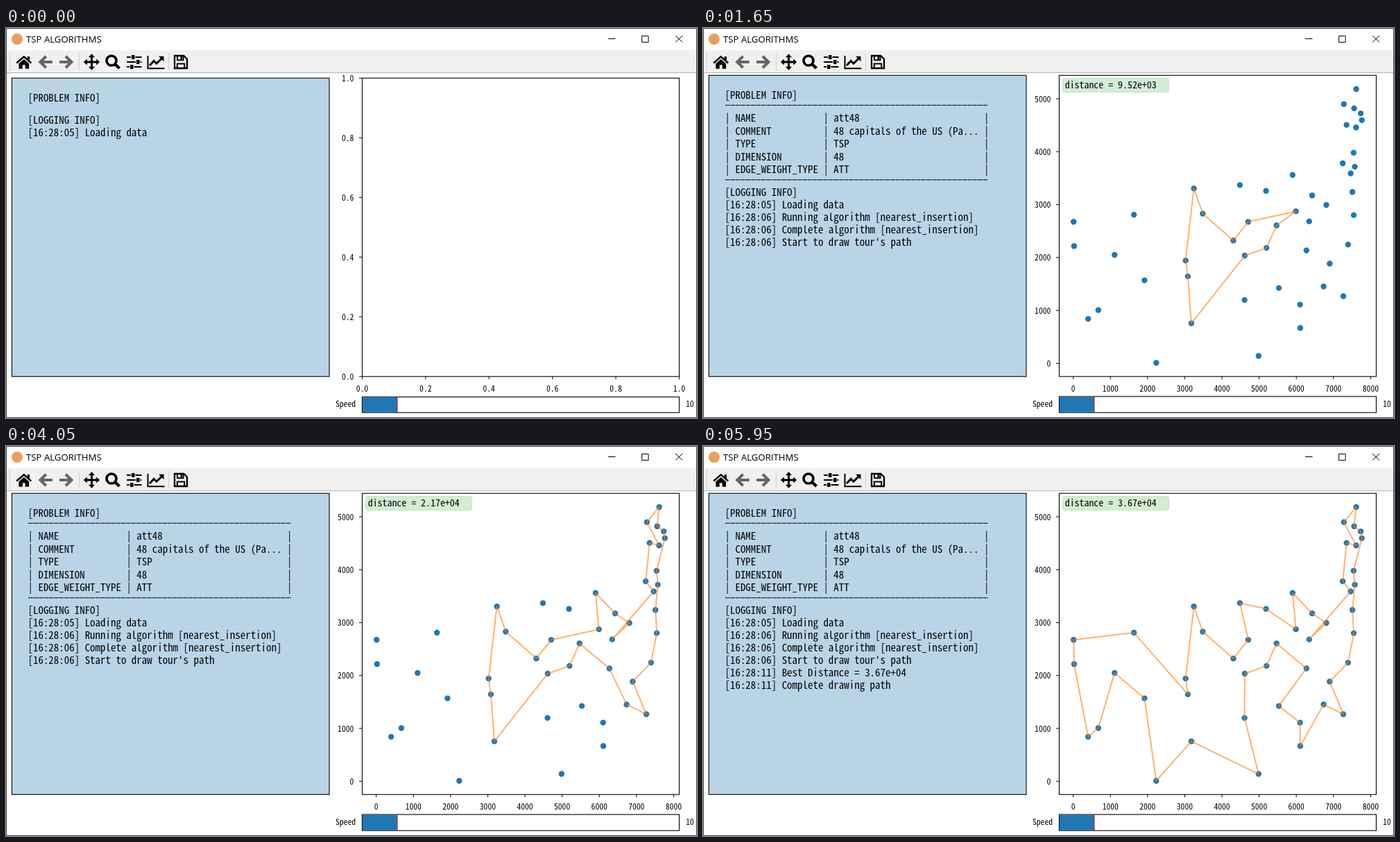
An HTML page with a canvas for the animation above (6250 ms loop, 996 px wide and 562 px high).

```html
<!DOCTYPE html>
<html lang="en">
<head>
<meta charset="utf-8">
<title>TSP ALGORITHMS</title>
<style>
html, body { margin: 0; width: 100%; height: 100%; overflow: hidden; background: #fff; }
canvas { display: block; }
</style>
</head>
<body>
<canvas id="stage" width="996" height="562"></canvas>
<script>
const ctx = document.getElementById('stage').getContext('2d');
const LOOP = 6250;
const BLUE = '#1f77b4';
const MONO = '"Noto Sans Mono CJK SC", "Noto Sans Mono CJK JP", "Liberation Mono", monospace';
const LOG_PITCH = 7.47;
const LABEL_PITCH = 5.8;
const LEFT = 513.4, RIGHT = 970.4, TOP = 68.2, BOTTOM = 502.2;

// The cities of att48 in the order of the finished tour.
const cities = [
  [3082, 1644], [3023, 1942], [3245, 3305], [3484, 2829], [4307, 2322], [4706, 2674],
  [4483, 3369], [5185, 3258], [5989, 2873], [5900, 3561], [6426, 3173], [6807, 2993],
  [6347, 2683], [7462, 3590], [7248, 3779], [7352, 4506], [7608, 4458], [7280, 4899],
  [7611, 5184], [7555, 4819], [7732, 4723], [7762, 4595], [7541, 3981], [7573, 3716],
  [7509, 3239], [7545, 2801], [7392, 2244], [6898, 1885], [7265, 1268], [6734, 1453],
  [6107, 669], [6101, 1110], [5530, 1424], [6271, 2135], [5468, 2606], [5199, 2182],
  [4612, 2035], [4608, 1198], [4985, 140], [3177, 756], [2233, 10], [1916, 1569],
  [1112, 2049], [675, 1006], [401, 841], [23, 2216], [10, 2676], [1633, 2809]
];
const START_CITY = 39;

const distance = (a, b) => Math.hypot(a[0] - b[0], a[1] - b[1]);

// Nearest insertion: always take the city closest to the tour.
function insertionRanks() {
  const rank = cities.map(() => Infinity);
  const gap = cities.map(c => distance(c, cities[START_CITY]));
  for (let n = 0; n < cities.length; n++) {
    let next = -1;
    cities.forEach((c, i) => {
      if (rank[i] === Infinity && (next < 0 || gap[i] < gap[next])) next = i;
    });
    rank[next] = n;
    cities.forEach((c, i) => { gap[i] = Math.min(gap[i], distance(c, cities[next])); });
  }
  return rank;
}
const ranks = insertionRanks();

// Fits the data between two edges with a margin of 5% of its range on both sides.
function fitScale(values, from, to) {
  const min = Math.min(...values);
  const range = Math.max(...values) - min;
  return v => from + (to - from) * (0.05 + (v - min) / range) / 1.1;
}
const px = fitScale(cities.map(c => c[0]), LEFT, RIGHT);
const py = fitScale(cities.map(c => c[1]), BOTTOM, TOP);

// The plot redraws after 100 and 150 ms in turn.
function lastRedraw(t) {
  const cycle = 50 + 250 * Math.floor((t - 50) / 250);
  return t - cycle < 100 ? cycle : cycle + 100;
}

// One city joins the tour every 108 ms.
function tourLength(t) {
  if (t < 600) return 0;
  const count = Math.floor((lastRedraw(t) - 451) / 108);
  return Math.min(Math.max(count, 1), cities.length);
}

function fillBox(x, y, w, h, color) {
  ctx.fillStyle = color;
  ctx.fillRect(x, y, w, h);
}

function frameBox(left, top, right, bottom, fill) {
  fillBox(left, top, right - left, bottom - top, fill);
  ctx.strokeStyle = '#000';
  ctx.lineWidth = 1.1;
  ctx.strokeRect(left, top, right - left, bottom - top);
}

function line(path, width = 1, color = '#000') {
  ctx.strokeStyle = color;
  ctx.lineWidth = width;
  ctx.stroke(new Path2D(path));
}

function shape(path, color = '#000') {
  ctx.fillStyle = color;
  ctx.fill(new Path2D(path));
}

function circle(x, y, r, color) {
  ctx.beginPath();
  ctx.arc(x, y, r, 0, 2 * Math.PI);
  ctx.fillStyle = color;
  ctx.fill();
}

// Draws an icon around its own centre.
function icon(x, y, paint) {
  ctx.save();
  ctx.translate(x, y);
  paint();
  ctx.restore();
}

ctx.font = `100px ${MONO}`;
const advance = ctx.measureText('0').width / 100;

function text(str, x, middle, pitch, align = 'left') {
  ctx.font = `${pitch / advance}px ${MONO}`;
  ctx.textAlign = align;
  ctx.fillStyle = '#000';
  ctx.fillText(str, x, middle + 0.7 * pitch);
}

function drawTitleBar() {
  circle(16, 16, 8, '#e9a05b');
  ctx.font = '13.2px "Open Sans", "Noto Sans", sans-serif';
  ctx.textAlign = 'left';
  ctx.fillStyle = '#000';
  ctx.fillText('TSP ALGORITHMS', 29, 21);
  line('M868 15.5h10.5M916.5 11.5h9.5v9h-9.5ZM965 11l10 9.5m0 -9.5l-10 9.5');
}

const icons = {
  home() {
    line('M-10.5 1.5L0 -7.6L10.5 1.5', 2.5);
    shape('M5 -8h3.2v7l-3.2 -3ZM-7.3 2.3L0 -4L7.3 2.3V9.8H2V4.3H-2V9.8H-7.3Z');
  },
  back() {
    line('M0.5 -8.3L-8 0L0.5 8.3M-8 0H9.5', 4, '#666');
  },
  forward() {
    ctx.scale(-1, 1);
    icons.back();
  },
  pan() {
    for (let i = 0; i < 4; i++) {
      ctx.rotate(Math.PI / 2);
      line('M0 0V-8', 3);
      shape('M0 -11.7l4.6 5h-9.2Z');
    }
  },
  zoom() {
    line('M-9 -2a7 7 0 1 0 14 0a7 7 0 1 0 -14 0', 3.6);
    line('M3 3l6.5 6', 4.4);
  },
  sliders() {
    for (let row = -1; row <= 1; row++) {
      const knob = row ? -5 - row : 3;
      fillBox(-11, row * 7 - 1, 21.5, 2, '#000');
      fillBox(knob - 1, row * 7 - 3, 6.5, 6, '#f0f0f0');
      fillBox(knob, row * 7 - 3, 4.5, 6, '#000');
    }
  },
  chart() {
    line('M-11.5 -9V9.2H12.5', 2);
    line('M-9 5l6.2 -6.5l3.8 3.7l8 -8', 3);
    shape('M4 -8.2h7.5v7.5Z');
  },
  save() {
    line('M-9 -9H4.3L9 -4.3V9H-9Z', 2.3);
    line('M-5 -9v6.2h8.5v-6.2M-5.2 9V2.5H5.2V9', 2);
    fillBox(-0.5, -8, 2.5, 4, '#000');
  }
};

function drawToolbar() {
  fillBox(0, 32, 996, 32, '#f0f0f0');
  fillBox(0, 64, 996, 1, '#b4b4b4');
  for (let y = 36; y < 61; y += 3) fillBox(5, y, 1, 1, '#999');
  line('M105.5 36V61M234.5 36V61', 1, '#d0d0d0');
  const centers = { home: 25.8, back: 57.3, forward: 86.5, pan: 123.5,
    zoom: 154, sliders: 185, chart: 216, save: 252 };
  for (const name in centers) icon(centers[name], 49, icons[name]);
}

function drawTable(top) {
  const rows = [
    ['NAME', 'att48'], ['COMMENT', '48 capitals of the US (Pa...'], ['TYPE', 'TSP'],
    ['DIMENSION', '48'], ['EDGE_WEIGHT_TYPE', 'ATT']
  ];
  ctx.setLineDash([6.8, 0.63]);
  line(`M32 ${top + 14.3}H411M32 ${top + 121.8}H411`, 1.1);
  ctx.setLineDash([]);
  rows.forEach(([key, value], i) =>
    text(`| ${key.padEnd(16)} | ${value.padEnd(28)} |`, 31.5, top + 33.2 + i * 18.5, LOG_PITCH));
}

function drawLog(t, shift) {
  const log = [
    [0, '[16:28:05] Loading data'],
    [250, '[16:28:06] Running algorithm [nearest_insertion]'],
    [400, '[16:28:06] Complete algorithm [nearest_insertion]'],
    [600, "[16:28:06] Start to draw tour's path"],
    [5950, '[16:28:11] Best Distance = 3.67e+04'],
    [5950, '[16:28:11] Complete drawing path']
  ];
  const top = 97 + shift;
  const logTop = top + (t < 100 ? 31.5 : 140);
  frameBox(8.5, TOP + shift, 466, BOTTOM, '#b9d4e7');
  text('[PROBLEM INFO]', 31.5, top, LOG_PITCH);
  if (t >= 100) drawTable(top);
  text('[LOGGING INFO]', 31.5, logTop, LOG_PITCH);
  log.filter(([from]) => t >= from)
    .forEach(([, entry], i) => text(entry, 31.5, logTop + 18 * (i + 1), LOG_PITCH));
}

function xTick(x, label) {
  line(`M${x} ${BOTTOM}v4`);
  text(label, x, 519.5, LABEL_PITCH, 'center');
}

function yTick(y, label) {
  line(`M${LEFT} ${y}h-4.5`);
  text(label, 501.3, y + 0.5, LABEL_PITCH, 'right');
}

function drawAxes(plotted, shift) {
  const top = TOP + shift;
  frameBox(LEFT, top, RIGHT, BOTTOM, '#fff');
  if (plotted) {
    for (let v = 0; v <= 8000; v += 1000) xTick(px(v), v);
    for (let v = 0; v <= 5000; v += 1000) yTick(py(v), v);
  } else {
    for (let v = 0; v < 1.1; v += 0.2) {
      xTick(LEFT + v * (RIGHT - LEFT), v.toFixed(1));
      yTick(BOTTOM + v * (top - BOTTOM), v.toFixed(1));
    }
  }
}

function drawSlider(plotted) {
  const top = plotted ? 531 : 531.7;
  frameBox(LEFT, top, RIGHT, 554.2, '#fff');
  fillBox(LEFT + 0.5, top + 0.5, 50.2, 553.7 - top - 0.5, BLUE);
  line(`M564 ${top + 0.5}V553.7`, 1, '#f00');
  text('Speed', 504, 542.3, LABEL_PITCH, 'right');
  text('10', 980, 542.3, LABEL_PITCH);
}

function formatDistance(value) {
  if (value < 1) return '0';
  const [mantissa, exponent] = value.toExponential(2).split('e+');
  return `${+mantissa}e+${exponent.padStart(2, '0')}`;
}

function drawTour(count) {
  const tour = cities.filter((c, i) => ranks[i] < count);
  const total = tour.reduce((sum, c, i) => sum + distance(c, tour[(i + 1) % count]), 0);

  ctx.beginPath();
  tour.forEach(([x, y]) => ctx.lineTo(px(x), py(y)));
  if (count > 2) ctx.closePath();
  ctx.lineJoin = 'round';
  ctx.lineWidth = 2;
  ctx.strokeStyle = 'rgba(255, 127, 14, 0.6)';
  ctx.stroke();
  ctx.lineJoin = 'miter';

  ctx.beginPath();
  ctx.roundRect(518.5, 72.5, 153, 20, 3);
  ctx.fillStyle = ctx.strokeStyle = 'rgba(44, 160, 44, 0.2)';
  ctx.lineWidth = 1;
  ctx.fill();
  ctx.stroke();
  text(`distance = ${formatDistance(total)}`, 521.7, 82.5, 6.95);
}

function draw(t) {
  const plotted = t >= 500;
  const shift = plotted ? 0 : 4;
  const count = tourLength(t);
  fillBox(0, 0, 996, 562, '#fff');
  drawTitleBar();
  drawToolbar();
  drawLog(t, shift);
  drawAxes(plotted, shift);
  drawSlider(plotted);
  if (plotted) cities.forEach(([x, y]) => circle(px(x), py(y), 4.2, BLUE));
  if (count) drawTour(count);
  line('M0.5 0.5H995.5V561.5H0.5Z', 1, '#3c3c3c');
}

function tick() {
  draw(performance.now() % LOOP);
  requestAnimationFrame(tick);
}
tick();
</script>
</body>
</html>
```
